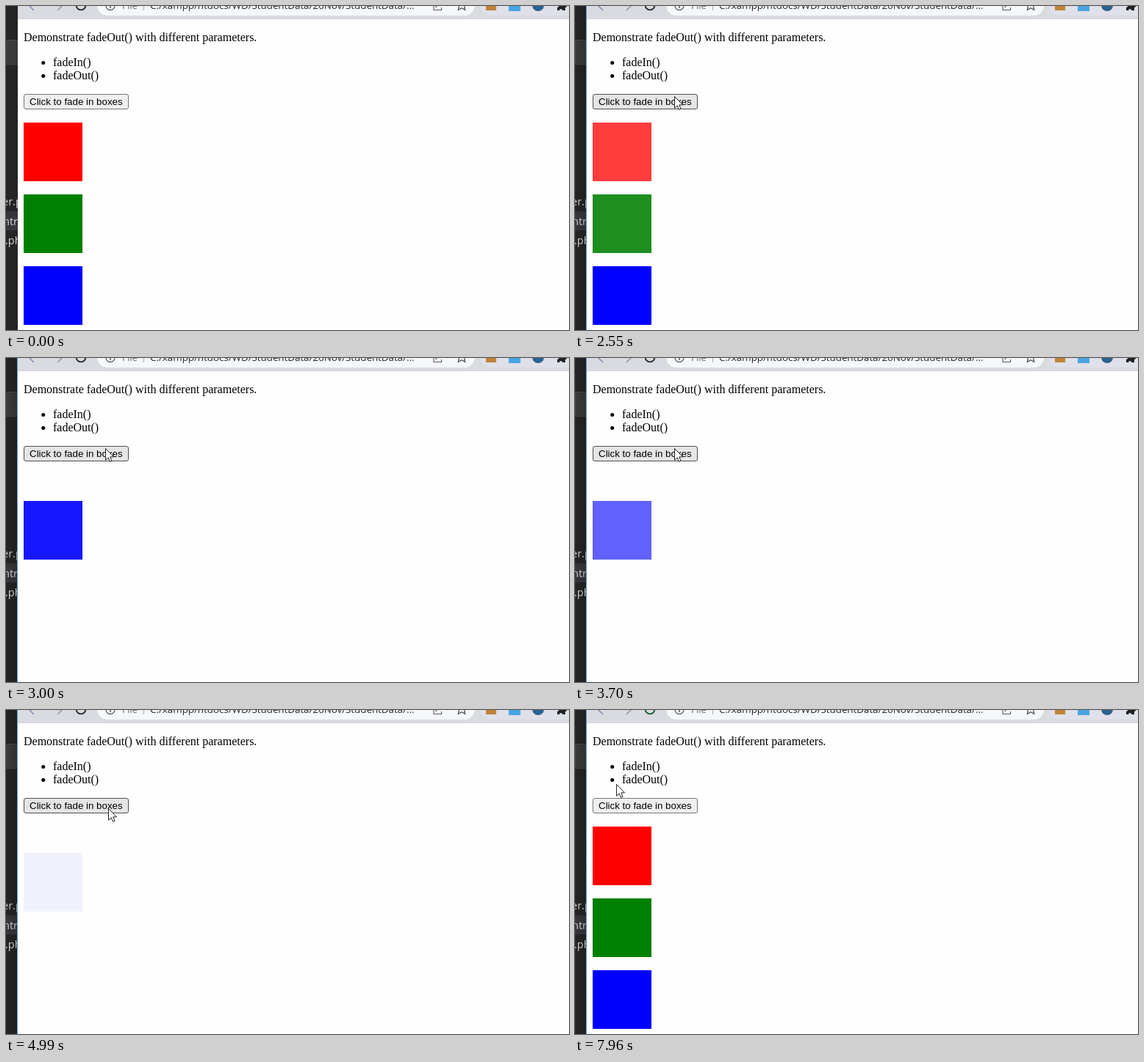
Animation, 766 px wide and 442 px high, one loop 8 s. Source, as an HTML page:

```html
<!DOCTYPE html>
<html lang="en">
<head>
<meta charset="utf-8">
<title>fadeOut demo</title>
<style>
html, body { margin: 0; width: 100%; height: 100%; overflow: hidden; background: #fefefe; }
svg { display: block; width: 766px; height: 442px; }
.page { font: 16px "Liberation Serif", "Times New Roman", serif; }
.ui { font: 13.33px "Open Sans", sans-serif; }
.side { font: 14.5px "Open Sans", sans-serif; fill: #d8d8d8; }
.btn { font: 13.333px "Liberation Sans", Arial, sans-serif; }
</style>
</head>
<body>
<svg viewBox="0 0 766 442">
  <defs>
    <linearGradient id="shade">
      <stop offset="0" stop-color="#000" stop-opacity="0"/>
      <stop offset="1" stop-color="#000" stop-opacity=".15"/>
    </linearGradient>
    <clipPath id="left"><rect width="16" height="442"/></clipPath>
  </defs>
  <rect width="766" height="442" fill="#fefefe"/>

  <!-- editor behind the window -->
  <g clip-path="url(#left)">
    <rect width="16" height="442" fill="#252526"/>
    <rect y="46.5" width="17" height="33" fill="#3a3a3a" stroke="#4a4a4a"/>
    <rect y="280" width="16" height="26" fill="#37373b"/>
    <g class="side">
      <text x="-5" y="272">er.php</text>
      <text x="-4" y="299">ntro.php</text>
      <text x="-1" y="325">.php</text>
    </g>
    <g id="focus">
      <rect width="16" height="442" fill="url(#shade)"/>
      <rect x="15" width="1" height="442" fill="#5aa5dd"/>
    </g>
  </g>

  <!-- browser toolbar -->
  <rect x="16" width="750" height="17" fill="#d9dbe0"/>
  <rect x="16" y="17" width="750" height="1" fill="#d0d2d7"/>
  <rect x="124" y="-15" width="514" height="28" rx="14" fill="#f6f7f9"/>
  <rect x="645" y="-15" width="140" height="28" rx="14" fill="#dfe0e9"/>
  <g fill="none" stroke-width="1.6">
    <path d="M38 -6L32 0L38 6" stroke="#8a8ab0"/>
    <path d="M70 -6L76 0L70 6" stroke="#9a9ca4"/>
    <path id="reload" d="M95.8 -2A6.3 6.3 0 1 0 108.2 -2" stroke-width="1.9"/>
    <circle cx="142" cy="-.5" r="6" stroke="#5f6368" stroke-width="1.3"/>
    <path d="M142 -2V3" stroke="#5f6368"/>
    <path d="M187.5 -6V6" stroke="#a5a7ac" stroke-width="1"/>
    <path d="M582 -4V5.5H592.5V2M585 2Q586 -2 593 -2" stroke="#5f6368" stroke-width="1.2"/>
    <path d="M616.5 -1L615.5 5.3L620 2.7L624.5 5.3L623.5 -1L626 -3" stroke="#4a4d55" stroke-width="1.3"/>
  </g>
  <g class="ui">
    <text x="158" y="4" fill="#6a6d72">File</text>
    <text x="196" y="4" fill="#25272b">C:/xampp/htdocs/WD/StudentData/26Nov/StudentData/...</text>
  </g>
  <rect x="653" y="-8" width="14" height="14" fill="#bd8436"/>
  <rect x="684" y="-8" width="16" height="15" fill="#4aa5e6"/>
  <circle cx="724" cy="-1" r="8" fill="#2d618f"/>
  <path d="M750 -6H761V-2A2 2 0 0 1 761 2V6H757A2 2 0 0 0 753 6H750V2A2 2 0 0 0 750 -2Z" fill="#202124"/>

  <!-- page -->
  <g class="page">
    <text x="24" y="48">Demonstrate fadeOut() with different parameters.</text>
    <circle cx="50.7" cy="77.5" r="2.5"/>
    <text x="64" y="82">fadeIn()</text>
    <circle cx="50.7" cy="95.5" r="2.5"/>
    <text x="64" y="100">fadeOut()</text>
  </g>
  <rect id="button" x="24.5" y="120.5" width="142" height="20" rx="2.5"/>
  <text class="btn" x="32" y="135">Click to fade in boxes</text>
  <g id="boxes">
    <rect x="24" width="80" height="80" fill="#f00"/>
    <rect x="24" width="80" height="80" fill="#008000"/>
    <rect x="24" width="80" height="80" fill="#00f"/>
  </g>

  <circle id="halo" r="12.3" fill="#fff200" opacity=".52"/>
  <path id="cursor" d="M.5 .5V16.3L4.1 12.9L6.5 18.4L9 17.3L6.7 11.9H11.5Z" fill="#fff" stroke="#222" stroke-linejoin="round"/>
</svg>
<script>
const LOOP = 8000, CLICK = 2340, FADE = 2420, RELOAD = 7380;
const IDLE = { from: 4990, to: 6450 };   // the screen does not refresh here
const DURATIONS = [400, 580, 3000];
const ENTRY = [353, 268];

// Pointer gestures; "via" is the control point of a curved one.
const moves = [
  { from: 470, to: 540, end: [248, 228] },
  { from: 1480, to: 2140, end: [135, 123], via: [447, -41] },
  { from: 3700, to: 4440, end: [182, 155] },
  { from: 4450, to: 4740, end: [139, 134] },
  { from: 6720, to: 6980, end: [467, 199] },
  { from: 7580, to: 7960, end: [56, 101], via: [0, 35] }
];

const $ = id => document.getElementById(id);
const boxes = [...$("boxes").children];
const clamp = v => Math.min(1, Math.max(0, v));
const swing = p => (1 - Math.cos(Math.PI * p)) / 2;
const within = (t, a, b) => t >= a && t < b;
const show = (el, on) => el.setAttribute("visibility", on ? "visible" : "hidden");

function pointer(t) {
  let pos = ENTRY;
  for (const { from, to, end, via } of moves) {
    if (t < from) break;
    const p = swing(clamp((t - from) / (to - from)));
    pos = pos.map((a, i) => {
      const c = via ? via[i] : (a + end[i]) / 2;
      return (1 - p) ** 2 * a + 2 * p * (1 - p) * c + p * p * end[i];
    });
  }
  return pos.map(Math.round);
}

function drawPointer(t) {
  const [x, y] = pointer(t);
  for (const id of ["cursor", "halo"]) $(id).setAttribute("transform", `translate(${x} ${y})`);
  const pressed = within(t, CLICK, CLICK + 70) || within(t, IDLE.to, IDLE.to + 140);
  const present = t >= moves[0].from;
  const hover = present && within(x, 24, 167) && within(y, 120, 141);
  const [fill, stroke] = pressed ? ["#f5f5f5", "#8d8d8d"]
    : hover ? ["#e5e5e5", "#4f4f4f"] : ["#efefef", "#767676"];
  $("button").setAttribute("fill", fill);
  $("button").setAttribute("stroke", stroke);
  show($("cursor"), present);
  show($("halo"), pressed);
}

// A faded box leaves only its line break behind, so the rest move up.
function drawBoxes(t) {
  let y = 159;
  boxes.forEach((box, i) => {
    const p = t < RELOAD ? clamp((t - FADE) / DURATIONS[i]) : 0;
    box.setAttribute("y", y);
    box.setAttribute("opacity", 1 - swing(p));
    show(box, p < 1);
    y += p < 1 ? 98 : 18;
  });
}

function draw(time) {
  const t = within(time, IDLE.from, IDLE.to) ? IDLE.from : time;
  show($("focus"), t >= CLICK);
  $("reload").setAttribute("stroke", t >= RELOAD ? "#155c2c" : "#25272b");
  drawPointer(t);
  drawBoxes(t);
}

let start;
function loop(now) {
  start ??= now;
  draw((now - start) % LOOP);
  requestAnimationFrame(loop);
}
draw(0);
requestAnimationFrame(loop);
</script>
</body>
</html>
```
